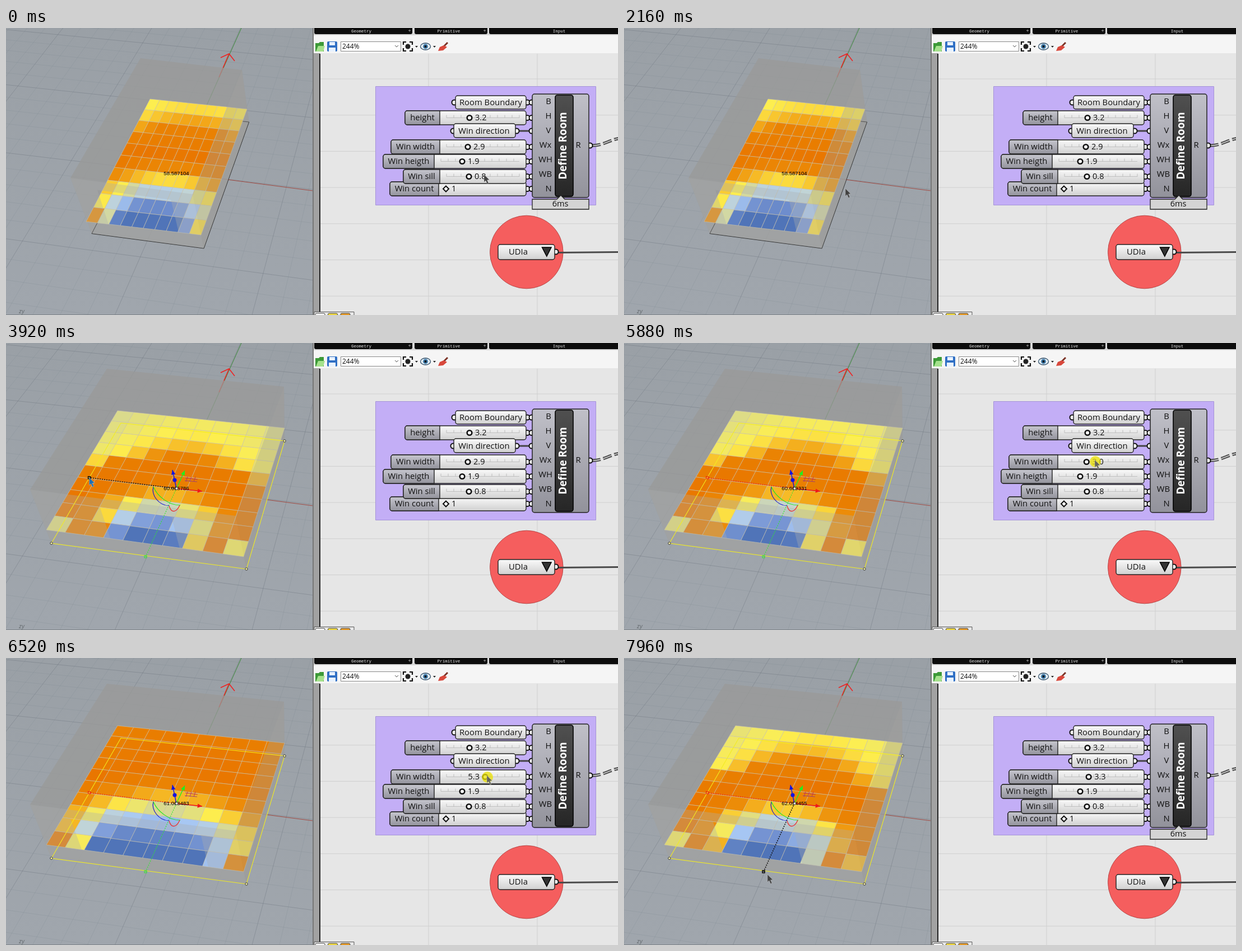
Animation of 1092 by 513 pixels, one loop 8000 ms. Source, as an HTML page with a canvas:

```html
<!DOCTYPE html>
<html lang="en">
<head>
<meta charset="utf-8">
<title>Daylight study</title>
<style>
html, body { margin: 0; width: 100%; height: 100%; overflow: hidden; background: #9da3aa; }
canvas { display: block; }
</style>
</head>
<body>
<canvas id="stage" width="1092" height="513"></canvas>
<script>
const ctx = document.getElementById('stage').getContext('2d');
const LOOP = 8000, TICK = 120;
const SELECT = 2280, GRAB = 2760, REBUILD = 3840, RELEASE = 4320, PRESS = 5760, LET_GO = 7440;
const UI = '"Open Sans", "Noto Sans", sans-serif';
const TAU = Math.PI * 2;

const POINTER = [[80, 853, 262], [960, 841, 169], [1200, 841, 169], [1720, 834, 249], [1880, 833, 247],
  [2160, 395, 287], [2280, 394, 286], [GRAB, 214, 248], [RELEASE, 147, 240], [5120, 892, 384], [5240, 892, 384],
  [5700, 840, 209], [6120, 840, 209], [6480, 858, 210], [7080, 836, 213], [7520, 832, 214], [7920, 256, 387]];
const STRETCH = [[GRAB, 0.575], [REBUILD, 1]];
const WINDOW_WIDTH = [[5640, 2.9], [PRESS, 3], [6120, 3], [6480, 5.3], [6760, 5.1], [7080, 4], [7400, 3.3]];
const READING = [[2.9, 60.606786], [3, 60.609331], [3.3, 62.054455], [4, 63.263386], [5.3, 61.003483]];

// Useful daylight level (index into RAMP) by illuminance: too dark, good, too bright.
const USEFUL = [[0.08, 4], [0.108, 5], [0.14, 7.9], [0.22, 8.3], [0.42, 7.6], [0.9, 3], [1.5, 1], [2.3, 0]];
const RAMP = ['#5074b8', '#7896d4', '#a8c8f4', '#c0d4d8', '#dada8c', '#fdef50', '#fbd83c', '#f3a91a', '#e97e00', '#e96300']
  .map(hex => [1, 3, 5].map(k => parseInt(hex.slice(k, k + 2), 16)));

const mix = (a, b, f) => a.map((v, i) => v + (b[i] - v) * f);
const smooth = f => f * f * (3 - 2 * f);

function at(keys, t, ease = f => f) {
  const i = keys.findIndex(k => k[0] > t);
  if (i === 0) return keys[0].slice(1);
  if (i < 0) return keys.at(-1).slice(1);
  const [a, b] = [keys[i - 1], keys[i]];
  return mix(a.slice(1), b.slice(1), ease((t - a[0]) / (b[0] - a[0])));
}

// Colour of one floor cell from the angle under which it sees the window.
function cellColor(column, row, roomWidth, windowWidth) {
  const x = (column - 4.5) / 10 * roomWidth - 0.15, d = (9.5 - row) * 0.8, half = windowWidth / 2;
  const angle = Math.atan((x + half) / d) - Math.atan((x - half) / d);
  const bounce = (8.27 / roomWidth) ** 0.3;
  const [level] = at(USEFUL, angle * bounce / (1 + (Math.min(d, 5) / 3) ** 2));
  const i = Math.min(8, Math.floor(level));
  return `rgb(${mix(RAMP[i], RAMP[i + 1], level - i).map(Math.round)})`;
}

// Perspective map of the unit square; corners: back left, back right, front right, front left.
function plane([[x0, y0], [x1, y1], [x2, y2], [x3, y3]]) {
  const sx = x0 - x1 + x2 - x3, sy = y0 - y1 + y2 - y3;
  const ax = x1 - x2, ay = y1 - y2, bx = x3 - x2, by = y3 - y2, d = ax * by - bx * ay;
  const g = (sx * by - bx * sy) / d, h = (ax * sy - sx * ay) / d;
  return (u, v) => {
    const w = 1 + g * u + h * v;
    return [(x0 + (x1 - x0 + g * x1) * u + (x3 - x0 + h * x3) * v) / w,
      (y0 + (y1 - y0 + g * y1) * u + (y3 - y0 + h * y3) * v) / w];
  };
}
const ground = plane([[205, 143], [497, 175], [429, 404], [81, 358]]);
const footprint = s => [[-1, 0], [1, 0], [1, 1], [-1, 1]].map(([side, v]) => ground(0.5 + side * s / 2, v));
const ROOMS = {
  small: { width: 4.75, floor: footprint(0.575), mesh: [[257, 127], [430, 145], [348, 370], [143, 346]],
    ceiling: [[240, 54], [421, 75], [333, 297], [115, 268]] },
  wide: { width: 8.27, floor: footprint(1), mesh: [[199, 121], [497, 152], [424, 382], [72, 334]],
    ceiling: [[180, 46], [496, 78], [410, 309], [43, 262]] } };

function paint(fill, stroke, width = 1) {
  if (fill) { ctx.fillStyle = fill; ctx.fill('evenodd'); }
  if (stroke) { ctx.strokeStyle = stroke; ctx.lineWidth = width; ctx.stroke(); }
}
function trace(points, closed) {
  points.forEach((p, i) => i ? ctx.lineTo(...p) : ctx.moveTo(...p));
  if (closed) ctx.closePath();
}
function poly(points, fill, stroke, width) { ctx.beginPath(); trace(points, true); paint(fill, stroke, width); }
function line(points, color, width) { ctx.beginPath(); trace(points); paint(null, color, width); }
function disc(x, y, r, fill, stroke, width) { ctx.beginPath(); ctx.arc(x, y, r, 0, TAU); paint(fill, stroke, width); }
function curve(start, controls, color, width) {
  ctx.beginPath(); ctx.moveTo(...start); ctx.bezierCurveTo(...controls); paint(null, color, width);
}
function box(x, y, r, b, radius, fill, stroke, width) {
  ctx.beginPath(); ctx.roundRect(x, y, r - x, b - y, radius); paint(fill, stroke, width);
}
function text(s, x, y, size = 14.8, { color = '#111', align = 'center', font = UI, weight = '' } = {}) {
  ctx.font = `${weight} ${size}px ${font}`;
  ctx.textAlign = align; ctx.textBaseline = 'middle'; ctx.fillStyle = color;
  ctx.fillText(s, x, y);
}
function shade(y, b, top, bottom) {
  const g = ctx.createLinearGradient(0, y, 0, b);
  g.addColorStop(0, top); g.addColorStop(1, bottom);
  return g;
}

function drawGround() {
  ctx.fillStyle = shade(0, 513, '#9aa0a6', '#a0a6ad');
  ctx.fillRect(0, 0, 548, 513);
  for (let i = -40; i <= 40; i++) {
    const color = i % 5 ? 'rgba(125,134,142,.25)' : 'rgba(105,114,122,.4)', c = 0.5 + i / 8.27;
    line([ground(c, -6), ground(c, 3)], color);
    if (c < 3) line([ground(-4, c), ground(4, c)], color);
  }
  line([[304, 259], [548, 291]], '#a04a42');
  line([[304, 259], [420, 0]], '#3f8c3c');
  line([[380, 88], [398, 46]], '#f02020', 1.5);
  line([[383, 53], [398, 46], [408, 59]], '#f02020', 1.5);
  text('zy', 28, 507, 10, { color: '#666c70', font: '"Liberation Sans", sans-serif', weight: 'italic' });
}

function drawRoom(room, windowWidth, outline, selected) {
  const { floor, mesh, ceiling } = room;
  const wall = (i, j) => [floor[i], floor[j], ceiling[j], ceiling[i]];
  poly([ceiling[0], ceiling[1], floor[1], floor[2], floor[3], ceiling[3]], 'rgba(154,154,152,.75)');
  if (!selected) poly(outline, null, '#222');

  const map = plane(mesh);
  for (let row = 0; row < 10; row++) for (let column = 0; column < 10; column++) {
    const corner = (i, j) => map((column + i) / 10, (row + j) / 10);
    poly([corner(0, 0), corner(1, 0), corner(1, 1), corner(0, 1)],
      cellColor(column, row, room.width, windowWidth), 'rgba(205,198,175,.7)', 0.9);
  }

  const half = windowWidth / room.width / 2;
  const sill = f => mix(mesh[3], mesh[2], f);
  const head = f => mix(mix(floor[3], floor[2], f), mix(ceiling[3], ceiling[2], f), 0.84);
  ctx.beginPath();
  trace(wall(3, 2), true);
  trace([sill(0.5 - half), sill(0.5 + half), head(0.5 + half), head(0.5 - half)], true);
  paint('rgba(170,172,172,.34)');
  poly(wall(1, 2), 'rgba(160,160,158,.36)');
  if (selected) poly(outline, null, '#f2ec20', 1.1);
}

function arrow(from, to, color) {
  line([from, to], color, 1.4);
  const a = Math.atan2(to[1] - from[1], to[0] - from[0]);
  const back = s => [to[0] - 9 * Math.cos(a + s), to[1] - 9 * Math.sin(a + s)];
  poly([to, back(0.42), back(-0.42)], color);
}
function handle(end, color, active) {
  const c = active ? '#111' : color;
  ctx.setLineDash([2, 2]);
  line([[304, 260], end], c, active ? 1.6 : 1.2);
  ctx.setLineDash([]);
  ctx.strokeStyle = c; ctx.lineWidth = active ? 1.6 : 1;
  ctx.strokeRect(end[0] - 2, end[1] - 2, 4, 4);
}
function drawGumball(grip, activeX, activeY) {
  handle(grip, '#f01818', activeX);
  handle([249, 382], '#30e830', activeY);
  const c = [304, 260];
  arrow(c, [297, 227], '#1414e0');
  arrow(c, [319, 228], '#20f020');
  arrow(c, [350, 265], '#f01818');
  disc(301, 245, 3.5, '#1414e0');
  curve([263, 257], [259, 272, 272, 290, 291, 291], '#1414d0', 1.2);
  curve([263, 257], [270, 274, 290, 290, 311, 290], '#20e820', 1.2);
  curve([291, 291], [295, 305, 304, 303, 310, 290], '#f02828', 1.2);
  for (let i = 0; i < 3; i++) line([[324 + i * 7, 239], [321 + i * 7, 248]], '#c03850');
  line([[320, 241], [342, 244]], '#c03850');
  line([[319, 246], [341, 248]], '#a04470');
}

function drawToolbar() {
  ctx.fillStyle = '#d8d8d8'; ctx.fillRect(548, 0, 544, 45);
  [[550, 725, 'Geometry', 634], [729, 859, 'Primitive', 790], [862, 1100, 'Input', 987]].forEach(([x, r, name, c]) => {
    box(x, -6, r, 11, 3, '#0c0c0c');
    text(name, c, 6, 7.5, { color: '#eee', font: '"Liberation Mono", monospace' });
    if (r < 1000) text('+', r - 5, 6, 9, { color: '#ccc' });
  });
  ctx.fillStyle = '#f5f5f5'; ctx.fillRect(549, 13, 543, 32);
  poly([[552, 42], [552, 27], [558, 27], [560, 25], [567, 25], [567, 42]], '#3d9a38');
  poly([[553, 42], [557, 32], [569, 32], [566, 42]], '#a5e28c');
  box(573, 24, 591, 42, 2, '#2f6fc4');
  ctx.fillStyle = '#e8f2ff'; ctx.fillRect(577, 25, 10, 6); ctx.fillRect(576, 35, 12, 7);
  box(597.5, 24.5, 704.5, 41.5, 0, '#fff', '#8a8a8a');
  text('244%', 600, 34, 12, { align: 'left' });
  line([[694, 31], [697, 34], [700, 31]], '#555');
  for (const sx of [-1, 1]) for (const sy of [-1, 1])
    line([[717 + sx * 8, 33 + sy * 3], [717 + sx * 8, 33 + sy * 8], [717 + sx * 3, 33 + sy * 8]], '#111', 2.2);
  disc(717, 33, 4.5, '#222');
  for (const x of [732, 764]) poly([[x - 2, 32], [x + 3, 32], [x + 0.5, 35]], '#222');
  ctx.beginPath(); ctx.ellipse(748.5, 33, 9, 6, 0, 0, TAU); paint('#e6f0f6', '#33506a', 1.3);
  disc(748.5, 33, 4.4, '#3c78a8'); disc(748.5, 33, 2, '#111');
  line([[780, 34], [788, 26]], '#7b3326', 3);
  poly([[771, 41], [774, 34], [781, 31], [787, 34], [780, 40]], '#d8483c');
}

function drawSheet() {
  ctx.fillStyle = '#e6e6e6'; ctx.fillRect(549, 45, 543, 468);
  for (let x = 754; x < 1092; x += 194) line([[x, 46], [x, 513]], '#cfcfcf');
  for (let y = 91; y < 513; y += 64.7) line([[560, y], [1092, y]], '#cfcfcf');
  ctx.fillStyle = '#a2a2a2'; ctx.fillRect(549, 45, 11, 468);
  line([[560, 46], [560, 513]], '#111', 1.8);
  ctx.fillStyle = '#777'; ctx.fillRect(547, 0, 2, 513);
  box(550, 507.5, 621, 520, 0, '#e8e8e8', '#555');
  ['#fafafa', '#f0d83c', '#e89a24'].forEach((c, i) => box(552 + i * 22.5, 510, 569 + i * 22.5, 520, 2, c, '#444'));
}

const grip = (x, y) => disc(x, y, 4.5, '#fff', '#111', 2);
function capsule(x, y, r, b) { box(x, y, r, b, 4, shade(y, b, '#fafafa', '#d0d0d0'), '#222', 1.4); }
function plug(y, from = 930) { line([[from, y], [938, y]], '#444', 3); grip(from, y); grip(938, y); }

function slider(name, x, split, y, value, knob, integer) {
  const b = y + 25, mid = y + 12.5, edge = 928;
  plug(mid);
  capsule(x, y, edge, b);
  box(x, y, split, b, [4, 0, 0, 4], shade(y, b, '#c6c6ce', '#93939c'), '#222', 1.4);
  text(name, (x + split) / 2, mid + 1);
  if (integer) {
    poly([[knob, mid - 5], [knob + 5, mid], [knob, mid + 5], [knob - 5, mid]], '#fff', '#111', 2);
  } else {
    line([[split + 12, mid], [edge - 12, mid]], '#c0c0c0');
    for (let tick = split + 12; tick <= edge - 11; tick += 13) line([[tick, mid - 5], [tick, mid]], '#bdbdbd');
    disc(knob, mid, 4.3, '#fff', '#111', 2.6);
  }
  const left = knob > 850;
  text(value, knob + (left ? -10 : 10), mid + 1, 14.5, { align: left ? 'right' : 'left' });
}

function drawDefinition(width, timing) {
  box(659.5, 104.5, 1052.5, 316.5, 0, '#c3aef6', '#a594d8');
  ctx.setLineDash([16, 5]);
  for (const [color, w] of [['#4a4a4a', 5.5], ['#d2d2d2', 1.6]])
    curve([1045, 210], [1064, 211, 1076, 200, 1096, 197], color, w);
  ctx.setLineDash([]);
  grip(1042, 210);

  grip(800, 133); plug(133);
  capsule(802, 121, 928, 145); text('Room Boundary', 865, 134);
  slider('height', 712, 774, 148, '3.2', 827);
  grip(798, 184); plug(184, 911);
  capsule(799, 171, 909, 196); text('Win direction', 853, 185);
  slider('Win width', 687, 774, 200, width.toFixed(1), 786.6 + 12.9 * width);
  slider('Win heigth', 673, 764, 226, '1.9', 814);
  slider('Win count', 685, 772, 275, '1', 785, true);
  slider('Win sill', 709, 774, 253, '0.8', 826);

  box(939, 118, 1040, 303, 4, shade(118, 303, '#c0c0c8', '#92929b'), '#222', 1.5);
  ['B', 'H', 'V', 'Wx', 'WH', 'WB', 'N'].forEach((s, i) => text(s, s[1] ? 962.5 : 968, 132 + i * 26));
  text('R', 1021, 210);
  box(980, 120, 1012, 301, 4, shade(120, 301, '#505050', '#262626'), '#000', 1.6);
  ctx.save();
  ctx.translate(995.5, 210.5); ctx.rotate(-Math.PI / 2);
  text('Define Room', 0, 0, 18.8, { color: '#fff', weight: 'bold' });
  ctx.restore();
  if (timing) {
    poly([[939, 306], [983, 306], [990, 299], [997, 306], [1040, 306], [1040, 324], [939, 324]], '#d4d4d4', '#222', 1.3);
    text(timing, 989, 315.5, 14.5);
  }

  disc(928.8, 400.5, 65.3, '#f55e5e', '#b84848');
  line([[984, 401.5], [1092, 400.5]], '#4a4a4a', 3.2);
  grip(981, 400);
  capsule(878, 387, 979, 414);
  text('UDIa', 914, 401);
  poly([[956.5, 392], [973, 392], [964.8, 408]], '#333', '#000', 1.5);
}

function drawPointer(x, y, pressed, hovering) {
  if (pressed) disc(x + 1, y + 3, 10, 'rgba(235,225,0,.75)');
  const shape = [[0, 0], [0, 13.5], [3, 10.8], [5.6, 16.5], [8, 15.4], [5.5, 9.8], [9.6, 9.6]];
  poly(shape.map(([a, b]) => [x + a, y + b]), hovering ? '#1f6fb4' : pressed ? '#66665a' : '#414141', 'rgba(235,235,235,.45)', 0.7);
}

function draw(t) {
  const wide = t >= REBUILD, selected = t >= SELECT, dragging = t >= GRAB && t < RELEASE;
  const [stretch] = at(STRETCH, t), [width] = at(WINDOW_WIDTH, t);
  const sideGrip = ground(0.5 - stretch / 2, 0.5), outline = footprint(stretch);
  const [x, y] = dragging ? sideGrip : at(POINTER, t, smooth);
  const reading = wide ? at(READING, width)[0] : 58.587104;
  const timing = !wide || t > 7080 ? '6ms' : t === 7080 ? '5ms' : '';

  ctx.save();
  ctx.beginPath(); ctx.rect(0, 0, 548, 513); ctx.clip();
  drawGround();
  drawRoom(wide ? ROOMS.wide : ROOMS.small, width, outline, selected);
  if (selected) {
    drawGumball(sideGrip, dragging, t >= 7920);
    outline.slice(1).forEach(p => disc(...p, 2.2, '#f4f0b0', '#333'));
  }
  text(reading.toFixed(6), 304, 260.5, 9.6, { color: '#000', font: '"Liberation Sans", Arial, sans-serif' });
  if (selected) disc(304.5, 260, 2.3, '#fff', '#333');
  line([[0, 512.5], [548, 512.5]], '#7c8288');
  ctx.restore();

  drawToolbar();
  drawSheet();
  drawDefinition(width, timing);
  drawPointer(x, y, t >= PRESS && t < LET_GO, dragging);
}

let shown = -1;
function frame(now) {
  const t = Math.floor(now % LOOP / TICK) * TICK;
  if (t !== shown) draw(shown = t);
  requestAnimationFrame(frame);
}
requestAnimationFrame(frame);
</script>
</body>
</html>
```
